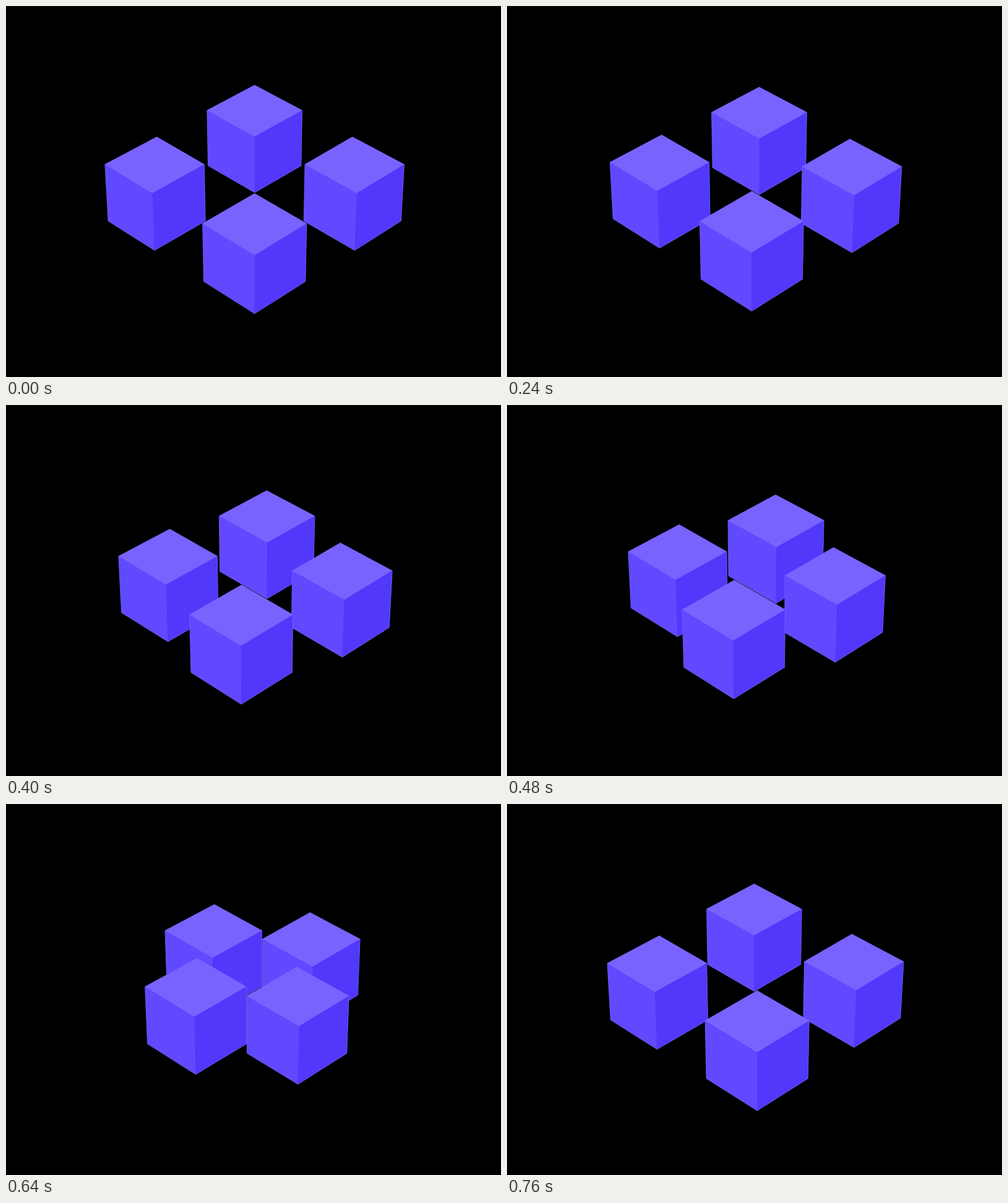
Write an HTML page that moves like this. It is 800 by 600 pixels and loops after 0.8 s.

```html
<!DOCTYPE html>
<html lang="en">
<head>
<meta charset="utf-8">
<title>Cubes</title>
<style>
html, body { margin: 0; width: 100%; height: 100%; overflow: hidden; background: #000; }
svg { display: block; width: 800px; height: 600px; }
</style>
</head>
<body>
<svg id="stage" viewBox="0 0 800 600" xmlns="http://www.w3.org/2000/svg">
  <rect width="800" height="600" fill="#000"/>
  <rect width="800" height="1" fill="#0e0e0e"/>
</svg>
<script>
const LOOP = 800, STEP = 40;
const DIST = 2.0127; // centre to cube, in half diagonals of a cube
const COLORS = { left: '#6049ff', top: '#7963ff', right: '#5138fb', edge: '#7c69ff' };
const stage = document.getElementById('stage');

function addPolygon(parent, attrs) {
  const el = document.createElementNS('http://www.w3.org/2000/svg', 'polygon');
  for (const key in attrs) el.setAttribute(key, attrs[key]);
  return parent.appendChild(el);
}

const cubes = Array.from({ length: 4 }, () => {
  const g = stage.appendChild(document.createElementNS('http://www.w3.org/2000/svg', 'g'));
  return {
    body: addPolygon(g, { fill: COLORS.left }),
    top: addPolygon(g, { fill: COLORS.top }),
    right: addPolygon(g, { fill: COLORS.right }),
    edge: addPolygon(g, { fill: 'none', stroke: COLORS.edge, 'stroke-width': 0.7, 'stroke-linejoin': 'round' })
  };
});

// u: sideways, v: towards the viewer, low: 1 for the bottom face
function project(u, v, low) {
  const q = 0.012456 - 0.00028 * v + 0.000275 * low;
  const x = 401.75 + u / q;
  const y = 240.2 + (0.2 + 0.5612 * v + 1.169 * low) / q;
  return x.toFixed(2) + ',' + y.toFixed(2);
}

// cubic-bezier(.995, 0, .735, 1)
function ease(x) {
  let lo = 0, hi = 1;
  for (let i = 0; i < 30; i++) {
    const s = (lo + hi) / 2, r = 1 - s;
    if (3 * r * r * s * 0.995 + 3 * r * s * s * 0.735 + s * s * s < x) lo = s;
    else hi = s;
  }
  return lo * lo * (3 - 2 * lo);
}

function drawCube(cube, u, v) {
  const back = project(u, v - 1, 0), front = project(u, v + 1, 0);
  const left = project(u - 1, v, 0), right = project(u + 1, v, 0);
  const lowFront = project(u, v + 1, 1);
  const lowLeft = project(u - 1, v, 1), lowRight = project(u + 1, v, 1);
  const outline = [back, right, lowRight, lowFront, lowLeft, left].join(' ');
  cube.body.setAttribute('points', outline);
  cube.edge.setAttribute('points', outline);
  cube.top.setAttribute('points', [back, right, front, left].join(' '));
  cube.right.setAttribute('points', [front, right, lowRight, lowFront].join(' '));
}

function render(ms) {
  const t = Math.floor((ms % LOOP) / STEP) * STEP;
  const p = ease(t / LOOP);
  const a = DIST * p, b = DIST * (1 - p);
  // each cube slides to the next corner, clockwise
  const places = [[a, -b], [b, a], [-a, b], [-b, -a]];
  places.sort((m, n) => m[1] - n[1]);
  places.forEach(([u, v], i) => drawCube(cubes[i], u, v));
}

let start = null;
function tick(now) {
  if (start === null) start = now;
  render(now - start);
  requestAnimationFrame(tick);
}
render(0);
requestAnimationFrame(tick);
</script>
</body>
</html>
```
